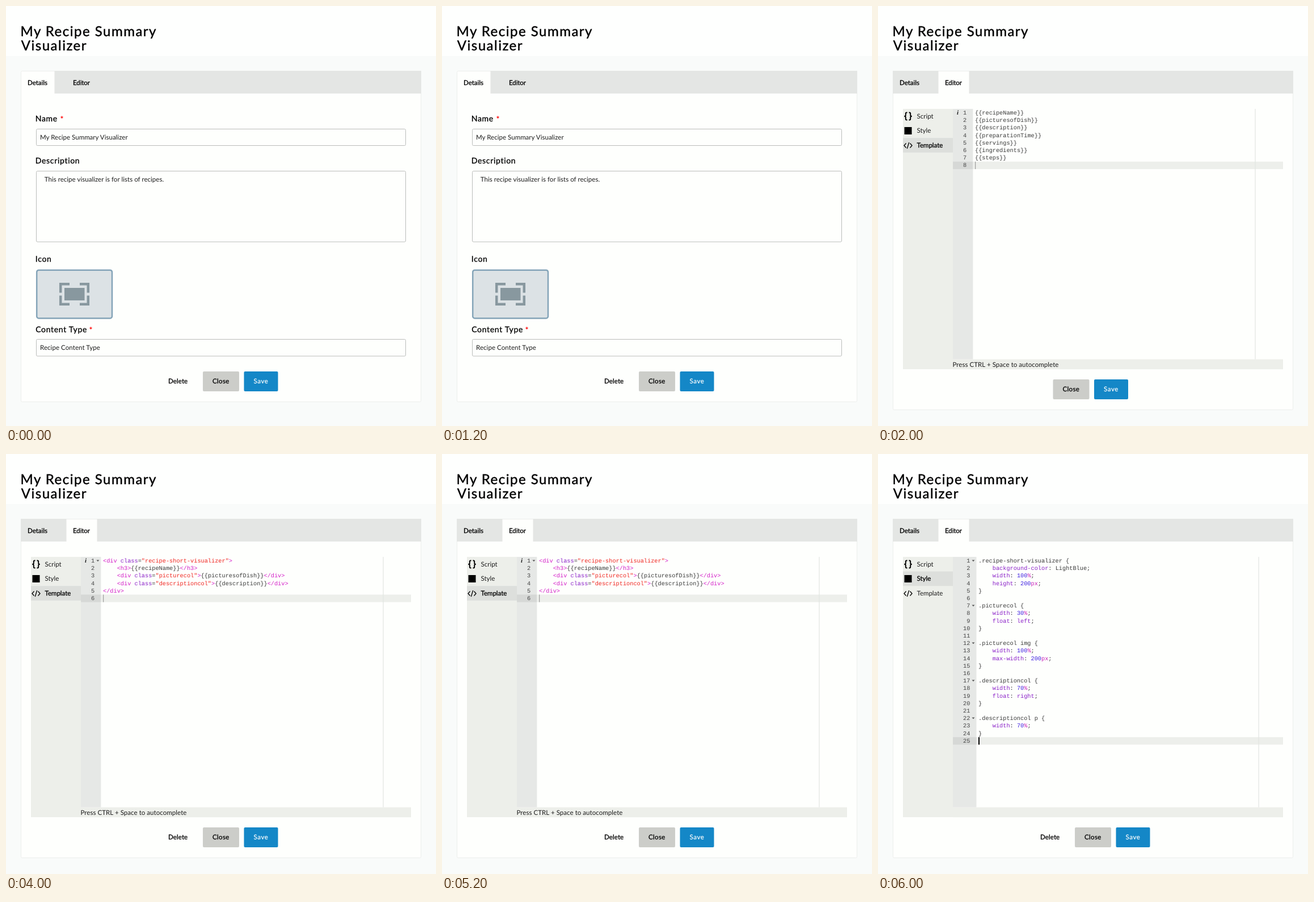
Recreate the animation shown at these times as an HTML page. Size 758 by 739 pixels, loop 8000 ms.

```html
<!DOCTYPE html>
<html lang="en">
<head>
<meta charset="utf-8">
<title>Recipe visualizer</title>
<style>
html, body { margin: 0; width: 100%; height: 100%; overflow: hidden; background: #f9fbfa; }
svg { display: block; width: 758px; height: 739px; }
text { font: 11.5px Lato, "Open Sans", sans-serif; fill: #1c1c1c; text-rendering: geometricPrecision; }
.m { fill: #000; stroke: #000; stroke-width: .3px; }
.title { font-size: 24px; letter-spacing: 1.5px; stroke-width: .45px; }
.label { font-size: 14px; letter-spacing: .68px; }
.star { font-size: 14px; font-weight: 700; fill: #f00; }
.save { fill: #fff; stroke: #fff; stroke-width: .2px; letter-spacing: .6px; }
.code { font: 10.28px "Liberation Mono", "Courier New", monospace; white-space: pre; fill: #3a3a3a; }
.num { text-anchor: end; fill: #444; }
.tag { fill: #d41fc8; }
.attr { fill: #8a1fc8; }
.str { fill: #f0251f; }
.val { fill: #3d1fe0; }
.unit { fill: #c81fb8; }
.field { fill: #fefffd; stroke: #bbbdbb; }
.scene { visibility: hidden; animation: show 8s step-end infinite; }
#template { animation-delay: -6s; }
#markup { animation-delay: -4s; }
#style { animation-delay: -2s; }
#editor { visibility: hidden; animation: later 8s step-end infinite; }
@keyframes show { 0% { visibility: visible; } 25%, 100% { visibility: hidden; } }
@keyframes later { 0% { visibility: hidden; } 25%, 100% { visibility: visible; } }
</style>
</head>
<body>
<svg viewBox="0 0 758 739">
  <defs>
    <g id="pair">
      <rect x="347" y="643" width="64" height="35" rx="2" fill="#cccdc9"/>
      <text class="m" x="364" y="664" letter-spacing=".35">Close</text>
      <rect x="419.5" y="643" width="60" height="35" rx="2" fill="#1487c7"/>
      <text class="save" x="436.5" y="664">Save</text>
    </g>
    <g id="trio">
      <text class="m" x="286" y="664" letter-spacing=".1">Delete</text>
      <use href="#pair"/>
    </g>
  </defs>

  <rect width="758" height="739" fill="#f9fbfa"/>
  <rect width="758" height="88" fill="#fefffe"/>
  <text class="m title" x="25.4" y="53">My Recipe Summary</text>
  <text class="m title" x="26.8" y="78">Visualizer</text>

  <g class="scene" id="details">
    <rect x="26.5" y="114.5" width="705" height="582" rx="2" fill="#fefffd" stroke="#eceeec"/>
    <rect x="85.5" y="114" width="646.5" height="40" fill="#e4e6e4"/>
    <text class="m" x="38" y="139">Details</text>
    <text class="m" x="118" y="139" letter-spacing="-.1">Editor</text>

    <text class="m label" x="51.8" y="203">Name</text>
    <text class="star" x="95.5" y="204">*</text>
    <rect class="field" x="53.5" y="216.5" width="651" height="29" rx="2"/>
    <text x="60" y="235" letter-spacing=".03">My Recipe Summary Visualizer</text>

    <text class="m label" x="51.8" y="277">Description</text>
    <rect class="field" x="53.5" y="290.5" width="651" height="124.5" rx="2"/>
    <text x="67.7" y="309" letter-spacing=".04">This recipe visualizer is for lists of recipes.</text>

    <text class="m label" x="51.8" y="450">Icon</text>
    <rect x="54.2" y="464.7" width="132.8" height="84.8" rx="3.5" fill="#dce2e5" stroke="#84a4b8" stroke-width="2.5"/>
    <path d="M96.2 504.5V489.2H112M130 489.2H144.8V504.5M144.8 509.5V524.8H130M112 524.8H96.2V509.5" fill="none" stroke="#88989f" stroke-width="4.5"/>
    <rect x="103" y="496" width="35.5" height="22" fill="#88989f"/>

    <text class="m label" x="52.2" y="573.5">Content Type</text>
    <text class="star" x="146.5" y="574.5">*</text>
    <rect class="field" x="53.5" y="586.5" width="651" height="29.5" rx="2"/>
    <text x="60" y="605" letter-spacing=".07">Recipe Content Type</text>
    <use href="#trio"/>
  </g>

  <g id="editor">
    <rect x="26.5" y="114.5" width="705" height="596" rx="2" fill="#fefffd" stroke="#eceeec"/>
    <path d="M26 114H106.5V154H26ZM160.5 114H732V154H160.5Z" fill="#e4e6e4"/>
    <text class="m" x="38" y="139">Details</text>
    <text class="m" x="118" y="139" letter-spacing="-.1">Editor</text>
    <rect x="44" y="181" width="88" height="458" fill="#edefea"/>
    <rect x="132" y="621.6" width="582" height="17.6" fill="#edefea"/>
  </g>

  <g class="scene" id="template"><use href="#pair" x="-38.5" y="14"/></g>
  <g class="scene" id="markup"><use href="#trio" y="14"/></g>
  <g class="scene" id="style"><use href="#trio" y="14"/></g>
</svg>
<script>
const ROW = 13.2, TOP = 181;

function add(parent, tag, attrs, text) {
  const el = document.createElementNS('http://www.w3.org/2000/svg', tag);
  for (const k in attrs) el.setAttribute(k, attrs[k]);
  if (text !== undefined) el.textContent = text;
  return parent.appendChild(el);
}

const box = (g, x, y, width, height, fill) => add(g, 'rect', { x, y, width, height, fill });

// Each rule pairs a token class with its pattern.
const htmlRules = [['str', '"[^"]*"'], ['tag', '</?\\w+|>'], ['attr', 'class']];
const cssRules = [
  ['attr', '(?<=^ +)[\\w-]+(?=:)|\\b(?:left|right)\\b'],
  ['val', '\\d+'],
  ['unit', '(?<=\\d)(?:px|%)']
];

function highlight(el, line, rules) {
  const re = new RegExp(rules.map(r => `(${r[1]})`).join('|'), 'g');
  let at = 0;
  for (const m of line.matchAll(re)) {
    if (m.index > at) add(el, 'tspan', {}, line.slice(at, m.index));
    const kind = rules[m.slice(1).findIndex(s => s !== undefined)][0];
    add(el, 'tspan', { class: kind }, m[0]);
    at = m.index + m[0].length;
  }
  if (at < line.length) add(el, 'tspan', {}, line.slice(at));
}

function sidebar(g, active) {
  box(g, 44, TOP + active * 25.6, 88, 25.6, '#dddfdc');
  ['Script', 'Style', 'Template'].forEach((name, i) => {
    const attrs = { x: 68.5, y: [198, 223, 249][i] };
    if (i === active) attrs.class = 'm';
    add(g, 'text', attrs, name);
  });
  const line = (d, w) => add(g, 'path', { d, fill: 'none', stroke: '#000', 'stroke-width': w });
  line('M51.5 187.5H50.5Q48.8 187.5 48.8 189.3V192Q48.8 194 46.3 194Q48.8 194 48.8 196V198.7Q48.8 200.5 50.5 200.5H51.5', 1.9);
  line('M54.5 187.5H55.5Q57.2 187.5 57.2 189.3V192Q57.2 194 59.7 194Q57.2 194 57.2 196V198.7Q57.2 200.5 55.5 200.5H54.5', 1.9);
  box(g, 46.5, 213, 13, 13, '#000');
  line('M49.5 241.5L46 245.5L49.5 249.5M56.5 241.5L60 245.5L56.5 249.5M54.7 240L51.3 251', 1.3);
}

function pane(id, edge, active, rules, source, hint) {
  const g = document.getElementById(id);
  const lines = source.split('\n');
  const last = TOP + .4 + ROW * (lines.length - 1);
  sidebar(g, active);
  box(g, 132, TOP, edge - 132, 440.6, '#e6e8e6');
  box(g, 132, last, edge - 132, ROW, '#d6d8d6');
  box(g, edge, last, 714 - edge, ROW, '#edefeb');
  box(g, edge + 497, TOP, 1.2, 440.6, '#e2e4e1');
  lines.forEach((line, i) => {
    const y = Math.round(191 + ROW * i);
    add(g, 'text', { class: 'code num', x: edge - 11.2, y }, i + 1);
    highlight(add(g, 'text', { class: 'code', x: edge + 3.6, y }), line, rules);
    if (/^\..*\{$|^<div/.test(line))
      add(g, 'path', { d: `M${edge - 8} ${y - 4.5}h5l-2.5 2.7z`, fill: '#555' });
  });
  if (hint) {
    box(g, edge + 3.8, last, 1, ROW, '#8a8c8a');
    add(g, 'text', { x: 139, y: 190.5, style: 'font:italic 700 11px "Liberation Serif",serif' }, 'i');
    add(g, 'text', { x: 131.5, y: 634.5, 'letter-spacing': .05 }, 'Press CTRL + Space to autocomplete');
  } else {
    box(g, edge + 3.5, last, 2, ROW, '#000');
  }
}

const fields = ['recipeName', 'picturesofDish', 'description', 'preparationTime', 'servings', 'ingredients', 'steps'];
pane('template', 167.4, 2, htmlRules, fields.map(f => `{{${f}}}\n`).join(''), true);

pane('markup', 167.4, 2, htmlRules, `<div class="recipe-short-visualizer">
    <h3>{{recipeName}}</h3>
    <div class="picturecol">{{picturesofDish}}</div>
    <div class="descriptioncol">{{description}}</div>
</div>
`, true);

pane('style', 173.5, 1, cssRules, `.recipe-short-visualizer {
    background-color: LightBlue;
    width: 100%;
    height: 200px;
}

.picturecol {
    width: 30%;
    float: left;
}

.picturecol img {
    width: 100%;
    max-width: 200px;
}

.descriptioncol {
    width: 70%;
    float: right;
}

.descriptioncol p {
    width: 70%;
}
`, false);
</script>
</body>
</html>
```
